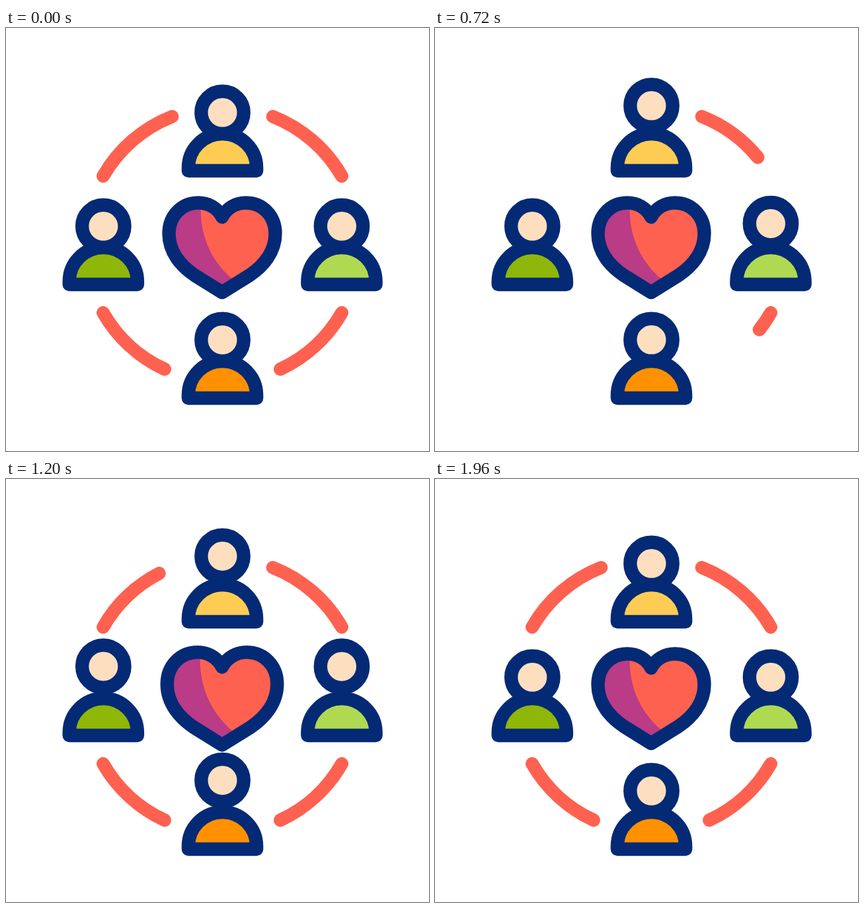
An HTML page that plays this animation: 640x640 px, repeating every 2000 ms.

```html
<!DOCTYPE html>
<html lang="en">
<head>
<meta charset="utf-8">
<title>Community</title>
<style>
  html, body { margin: 0; width: 100%; height: 100%; overflow: hidden; background: #fff; }
  svg { display: block; width: 100%; height: 100%; }
  .line { stroke: #042a75; stroke-width: 20.4; stroke-linejoin: round; stroke-linecap: round; }
  .arc { fill: none; stroke: #ff6150; stroke-width: 20; stroke-linecap: round; }
</style>
</head>
<body>
<svg id="stage" viewBox="0 0 640 640">
  <defs>
    <path id="heartShape" d="M327 286C320 272 306 264.5 291 264.5C266 264.5 246.5 284 246.5 311C246.5 340 266 361 286 374.5L327 400L368 374.5C388 361 407.5 340 407.5 311C407.5 284 388 264.5 363 264.5C348 264.5 334 272 327 286Z"/>
    <clipPath id="heartClip"><use href="#heartShape"/></clipPath>
  </defs>
  <g id="arcs"></g>
  <g id="heart">
    <use href="#heartShape" fill="#ff6150"/>
    <path clip-path="url(#heartClip)" fill="#ba3b86" d="M295 262C292 308 306 352 350 386V420H230V250H295Z"/>
    <use id="heartLine" href="#heartShape" class="line" fill="none"/>
  </g>
  <g id="people"></g>
</svg>
<script>
const LOOP = 2000, STEP = 40;
const CENTER = 327.5, RADIUS = 208, LINE = 20.4;
const ERASE_END = 460, DRAW_TIME = 372;

const arcs = [
  { from: -68.5, to: -29.8, start: 468 },
  { from: 29.8, to: 65.1, start: 601 },
  { from: 114.9, to: 150.2, start: 735 },
  { from: 209.8, to: 248.5, start: 920 }
];

// rise and fall: start and end times of each head's hop
const people = [
  { x: 327.5, y: 128, color: '#ffcc53', hop: 17.3, rise: [430, 940], fall: [1000, 1500] },
  { x: 508, y: 300, color: '#b0d952', hop: 17.2, rise: [565, 1065], fall: [1133, 1633] },
  { x: 327.5, y: 472, color: '#ff9100', hop: 16, rise: [690, 1220], fall: [1267, 1767] },
  { x: 147.3, y: 300, color: '#8eb709', hop: 17.6, rise: [820, 1270], fall: [1400, 1900] }
];

const byId = id => document.getElementById(id);

function add(parent, tag, attributes) {
  const node = document.createElementNS('http://www.w3.org/2000/svg', tag);
  for (const name in attributes) node.setAttribute(name, attributes[name]);
  return parent.appendChild(node);
}

function ease(time, start, end) {
  const p = Math.min(1, Math.max(0, (time - start) / (end - start)));
  return p * p * (3 - 2 * p);
}

const bump = (time, rise, fall) => ease(time, ...rise) - ease(time, ...fall);

function circlePoint(degrees) {
  const a = degrees * Math.PI / 180;
  return `${CENTER + RADIUS * Math.cos(a)} ${CENTER + RADIUS * Math.sin(a)}`;
}

for (const arc of arcs) {
  arc.node = add(byId('arcs'), 'path', {
    class: 'arc', pathLength: 1,
    d: `M${circlePoint(arc.from)}A${RADIUS} ${RADIUS} 0 0 1 ${circlePoint(arc.to)}`
  });
}

for (const person of people) {
  const group = add(byId('people'), 'g', { transform: `translate(${person.x} ${person.y})` });
  person.head = add(group, 'circle', { class: 'line', r: 32.2, fill: '#fddfc0' });
  add(group, 'path', {
    class: 'line', fill: person.color,
    d: 'M-51.6 88V83.6A51.6 51.6 0 0 1 51.6 83.6V88Z'
  });
}

function render(time) {
  for (const { node, start } of arcs) {
    const shown = time < ERASE_END
      ? 1 - ease(time, 0, ERASE_END)
      : ease(time, start, start + DRAW_TIME);
    node.setAttribute('visibility', shown > 0.001 ? 'visible' : 'hidden');
    node.setAttribute('stroke-dasharray', shown < 1 ? `${shown} 2` : 'none');
  }
  for (const { head, hop, rise, fall } of people) {
    head.setAttribute('cy', -hop * bump(time, rise, fall));
  }
  const scale = 1 + 0.16 * bump(time, [1100, 1433], [1433, 1767]);
  byId('heart').setAttribute('transform', `translate(327 332) scale(${scale}) translate(-327 -332)`);
  byId('heartLine').style.strokeWidth = LINE / scale;
}

const origin = performance.now();

function tick() {
  const time = (performance.now() - origin) % LOOP;
  render(Math.floor(time / STEP) * STEP);
  requestAnimationFrame(tick);
}

tick();
</script>
</body>
</html>
```
